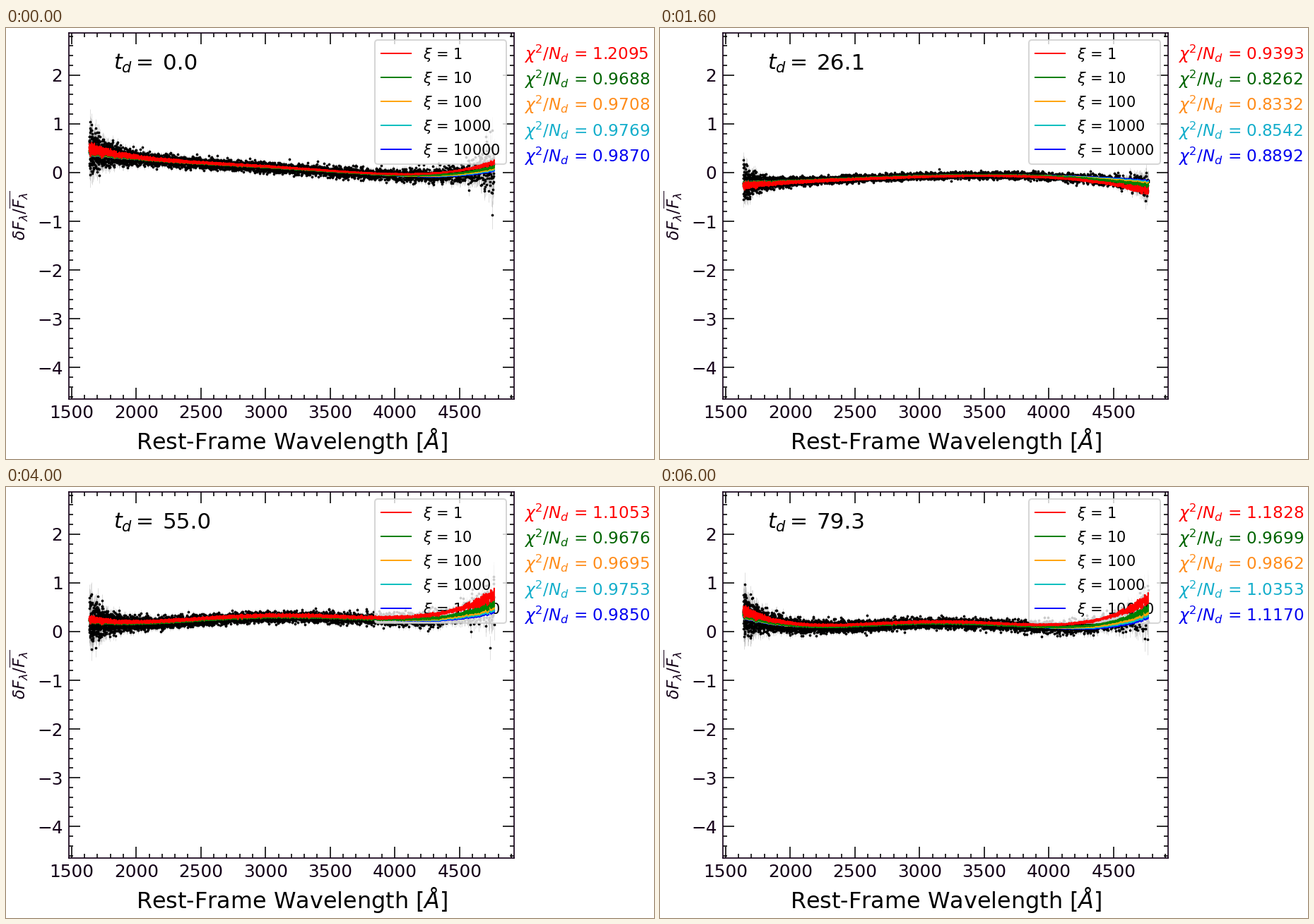
Recreate the animation shown at these times as a matplotlib script. Size 917x611 px, loop 6.2 s.

```python
import numpy as np
import matplotlib.pyplot as plt
from matplotlib.animation import FuncAnimation
from matplotlib.patches import FancyBboxPatch
from matplotlib.ticker import MultipleLocator
from matplotlib.transforms import Affine2D

W, H, DPI = 917, 611, 64
PT = 72 / DPI                      # points per pixel
FRAMES, STEP = 31, 200
INK = "#140018"

# Anchor epochs: step, day, fit chi2 (xi = 1, 10, 10000), curve height at KNOTS.
KNOTS = np.array([1640, 2300, 3100, 4000, 4768])
EPOCHS = np.array([
    (0, 0.0, 1.2095, 0.9688, 0.9870, 0.50, 0.24, 0.11, -0.03, 0.21),
    (5, 17.0, 0.9731, 0.9600, 1.0279, 0.38, 0.20, 0.13, 0.12, -0.27),
    (8, 26.1, 0.9393, 0.8262, 0.8892, -0.26, -0.16, -0.08, -0.10, -0.38),
    (13, 39.0, 0.9373, 0.9281, 0.9285, 0.10, 0.10, 0.01, 0.00, 0.32),
    (20, 55.0, 1.1053, 0.9676, 0.9850, 0.26, 0.23, 0.33, 0.29, 0.76),
    (24, 63.7, 0.9577, 0.9505, 0.9515, 0.12, 0.28, 0.37, 0.34, 0.54),
    (30, 79.3, 1.1828, 0.9699, 1.1170, 0.44, 0.13, 0.20, 0.14, 0.68),
])

LINE_COLORS = ["red", "green", "orange", "c", "blue"]
TEXT_COLORS = ["red", "#006400", "#ff8c1a", "#14aecb", "#0000f0"]
STIFF = np.sqrt(np.linspace(0, 1, 5))    # how strongly each xi flattens the ends

lam = 10 ** np.arange(np.log10(1637), np.log10(4768.5), 1e-4)
short, far = lam - 1637, 4768.5 - lam


def fade(distance, reach):
    return np.exp(-distance / reach)


sigma = (0.05 + 0.17 * fade(short, 90) + 0.05 * fade(short, 350)
         + 0.18 * fade(far, 80) + 0.09 * fade(far, 400))
rough = 0.12 + 0.25 * fade(short, 180) + 0.2 * fade(far, 150)
grain = rough * np.random.default_rng(7).standard_normal(lam.size)
short_bend = np.clip((2200 - lam) / 563, 0, None) ** 1.5
far_bend = np.clip((lam - 3700) / 1068, 0, None) ** 2


def unit(x):
    return (x - 3200) / 1570


def epoch(i):
    """Day, the five chi2 values and the curve heights at step i."""
    day, first, low, high, *heights = [
        np.interp(i, EPOCHS[:, 0], col) for col in EPOCHS[:, 1:].T]
    ramp = np.linspace(0, 1, 4) ** 2
    return day, [first, *(low + (high - low) * ramp)], heights


def models(chi2, heights):
    """Five curves; larger xi flattens both ends when the fits disagree."""
    base = np.polyval(np.polyfit(unit(KNOTS), heights, 4), unit(lam))
    damp = min(1, np.ptp(chi2) / 0.07)
    short_rise = 0.3 * damp * (heights[0] - heights[1])
    far_rise = 0.65 * damp * (heights[4] - heights[3])
    for stiff in STIFF:
        smooth = (base - stiff * short_rise * short_bend
                  - far_rise * (stiff * far_bend + 0.08 * (stiff > 0)))
        yield smooth, (1 - 0.4 * stiff) * (0.03 + 0.3 * np.abs(smooth)) * grain


fig = plt.figure(figsize=(W / DPI, H / DPI), dpi=DPI, facecolor="white")
ax = fig.add_axes([89 / W, 1 - 525.5 / H, 630 / W, 518.5 / H])
ax.set(xlim=(1479.5, 4922), ylim=(-4.64, 2.866))
stage = Affine2D().scale(1 / W, -1 / H).translate(0, 1) + fig.transFigure


def label(x, y, text, size, color="black", **kw):
    return ax.text(x, y, text, fontsize=size * PT, color=color,
                   transform=stage, **kw)


for axis, major, minor in ((ax.xaxis, 500, 100), (ax.yaxis, 1, 0.2)):
    axis.set_major_locator(MultipleLocator(major))
    axis.set_minor_locator(MultipleLocator(minor))
ax.tick_params(which="both", direction="in", top=True, right=True,
               width=1.6 * PT, color="black")
ax.tick_params(which="major", length=16 * PT, pad=8.5 * PT,
               labelsize=24.8 * PT, labelcolor=INK)
ax.tick_params(which="minor", length=6 * PT)
for spine in ax.spines.values():
    spine.set(linewidth=1.7 * PT, edgecolor=INK)

label(404.5, 597, r"Rest-Frame Wavelength [$\AA$]", 31.85, ha="center")
label(28, 266, r"$\delta F_\lambda/\overline{F_\lambda}$", 23, INK,
      ha="center", rotation=90, rotation_mode="anchor")
label(152, 59, r"$t_d =$", 30)
day_text = label(222, 59, "", 31)
chi_texts = [label(733, 45 + 36.2 * k, "", 23.1, c)
             for k, c in enumerate(TEXT_COLORS)]

ax.add_patch(FancyBboxPatch(
    (522, 17), 186, 176, boxstyle="round,pad=0,rounding_size=4.3",
    facecolor="white", edgecolor="0.8", alpha=0.8, linewidth=2 * PT,
    transform=stage, zorder=5))
for k, color in enumerate(LINE_COLORS):
    y = 36 + 34 * k
    ax.plot([530, 574], [y, y], color=color, lw=2 * PT, transform=stage,
            zorder=6, solid_capstyle="butt")
    label(590, y + 7.7, rf"$\xi$ = {10 ** k}", 20.9, zorder=6)

bars = ax.vlines(lam, 0, 0, color="0.55", alpha=0.3, lw=0.9 * PT, zorder=1)
dots, = ax.plot([], [], "o", color="black", ms=3.7 * PT, mew=0, zorder=2)
curves = [ax.plot([], [], color=c, lw=2.2 * PT, zorder=8 - 0.1 * k)[0]
          for k, c in enumerate(LINE_COLORS)]


def draw(i):
    day, chi2, heights = epoch(i)
    fits = list(models(chi2, heights))
    for curve, (smooth, jitter) in zip(curves, fits):
        curve.set_data(lam, smooth + jitter)

    # A better fit goes with quieter data.
    err = 1.1 * chi2[1] ** 3 * sigma
    flux = fits[1][0] + err * np.random.default_rng(100 + i).standard_normal(lam.size)
    dots.set_data(lam, flux)
    bars.set_segments(np.stack([np.stack([lam, flux - err], axis=1),
                                np.stack([lam, flux + err], axis=1)], axis=1))

    day_text.set_text(f"{day:.1f}")
    for text, value in zip(chi_texts, chi2):
        text.set_text(rf"$\chi^2/N_d$ = {value:.4f}")
    return [bars, dots, *curves, day_text, *chi_texts]


anim = FuncAnimation(fig, draw, frames=FRAMES, interval=STEP,
                     repeat=True, blit=False)
plt.show()
```
